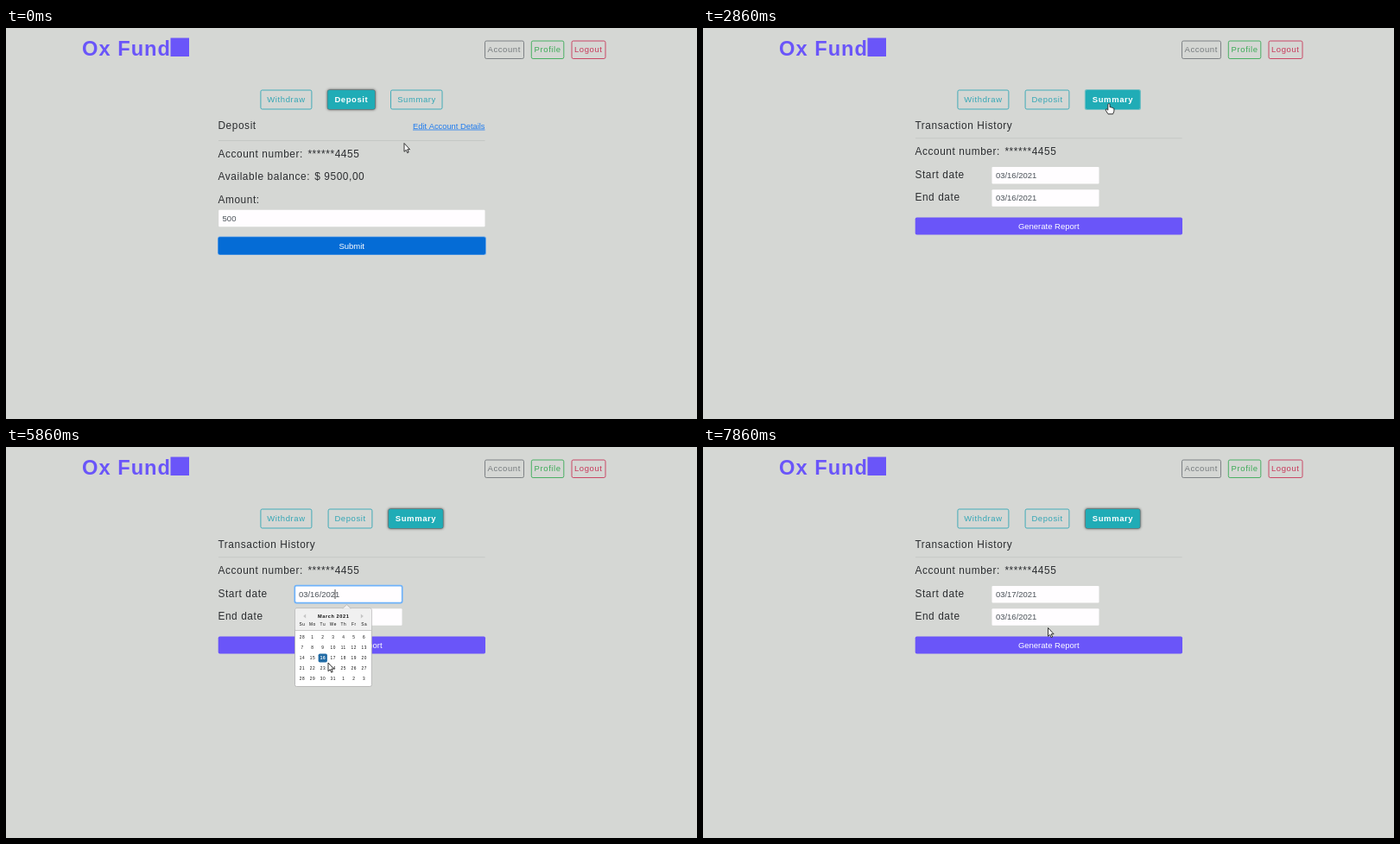
Recreate the animation shown at these times as an HTML page with a canvas. Size 800x453 px, loop 8 s.

```html
<!DOCTYPE html>
<html lang="en">
<head>
<meta charset="utf-8">
<title>Account</title>
<style>
html, body { margin: 0; width: 100%; height: 100%; overflow: hidden; background: #d5d7d4; }
canvas { display: block; }
</style>
</head>
<body>
<canvas id="stage" width="800" height="453"></canvas>
<script>
const ctx = document.getElementById('stage').getContext('2d');
const LOOP = 8000, STEPS = 56;
const INK = '#2b2d30', FIELD = '#495057', TEAL = '#20acb6', PURPLE = '#6a55f9', BLUE = '#056cd6';
const SMALL = 9.49, LARGE = 11.86, SPACING = 0.593;

// [step, x, y, pointer]; positions between entries are interpolated
const PATH = [
  [0, 461, 133.5, 'arrow'], [1, 462, 130, 'arrow'], [3, 467, 104, 'arrow'],
  [4, 468.5, 94, 'hand'], [7, 470, 87.5, 'hand'], [25, 470, 87.5, 'hand'],
  [27, 467.5, 90.5, 'hand'], [28, 454, 108, 'arrow'], [30, 408, 153, 'arrow'],
  [31, 390, 166, 'beam'], [33, 381, 171, 'beam'], [35, 381, 172, 'beam'],
  [36, 380, 184, 'arrow'], [39, 375, 238, 'arrow'], [41, 373, 250, 'arrow'],
  [43, 375, 246, 'hand'], [49, 376, 244.5, 'hand'], [52, 375.5, 244.5, 'arrow'],
  [53, 375.5, 244.5, 'arrow'], [54, 386, 228, 'hand'], [55, 399.5, 209.5, 'arrow']
];

function text(str, x, y, { size = SMALL, color = INK, spacing = 0, bold = false, align = 'left' } = {}) {
  ctx.font = `${bold ? 'bold ' : ''}${size}px "Liberation Sans", Arial, sans-serif`;
  ctx.letterSpacing = spacing + 'px';
  ctx.textAlign = align;
  ctx.fillStyle = color;
  ctx.fillText(str, x, y);
}

const label = (str, x, y) => text(str, x, y, { size: LARGE, spacing: SPACING });

function box(x, y, w, h, fill, stroke, radius = 1.8, width = 0.9) {
  ctx.beginPath();
  ctx.roundRect(x, y, w, h, radius);
  if (fill) { ctx.fillStyle = fill; ctx.fill(); }
  if (stroke) { ctx.strokeStyle = stroke; ctx.lineWidth = width; ctx.stroke(); }
}

function outlineButton(str, x, y, w, h, textX, color) {
  box(x, y, w, h, null, color);
  text(str, textX, y + h / 2 + 3.1, { color, spacing: SPACING });
}

function filledTab(str, x, w, textX, ring, bold = true) {
  if (ring === 'shadow') {
    ctx.save();
    ctx.shadowColor = 'rgba(40,40,40,.9)';
    ctx.shadowBlur = 3;
    box(x, 71.5, w, 23, '#4f7376', null, 2.5);
    ctx.restore();
  } else if (ring === 'glow') {
    box(x - 0.7, 71.1, w + 1.4, 23.8, 'rgba(32,172,182,.55)', null, 2.5);
  }
  box(x + 0.5, 72, w - 1, 22, TEAL);
  text(str, textX, 86.2, { color: '#fff', spacing: SPACING, bold });
}

function rule(y) {
  ctx.fillStyle = '#c1c3c1';
  ctx.fillRect(246, y, 308.5, 0.8);
}

function input(str, x, y, w, ring = 0) {
  box(x, y, w, 19.5, '#fffdff', null, 1);
  if (ring) box(x - 0.2, y - 0.2, w + 0.4, 19.9, null, `rgba(110,178,250,${ring})`, 2, 1.7);
  text(str, x + 4.4, y + 12.7, { color: FIELD });
}

function wideButton(str, y, fill, ring) {
  if (ring) box(245, y - 0.7, 311, 21.6, 'rgba(90,160,235,.85)', null, 2.5);
  box(245.7, y, 309.3, 20.2, fill);
  text(str, 400.2, y + 13.4, { color: '#fff', align: 'center' });
}

function header() {
  text('Ox Fund', 88, 32.4, { size: 23.7, color: PURPLE, spacing: 1, bold: true });
  ctx.fillStyle = PURPLE;
  ctx.fillRect(190.5, 11.5, 21.5, 21.5);
  outlineButton('Account', 554.5, 15, 45, 20.5, 557.5, '#74797c');
  outlineButton('Profile', 608.3, 15, 37.5, 20.5, 611.6, '#3cab57');
  outlineButton('Logout', 655, 15, 39, 20.5, 658, '#c8385a');
  outlineButton('Withdraw', 294.9, 72, 59, 22, 302.3, '#32a6b5');
}

function depositPage(step) {
  filledTab('Deposit', 372, 55.5, 380.4, 'shadow');
  if (step < 4) outlineButton('Summary', 445.5, 72, 59.5, 22, 453.2, '#32a6b5');
  else filledTab('Summary', 445, 60.5, 453.2, step >= 18 && 'glow', false);

  label('Deposit', 245.4, 116.8);
  text('Edit Account Details', 471, 116.7, { size: 9.33, color: '#1f7bee' });
  ctx.fillStyle = '#1f7bee';
  ctx.fillRect(471, 117.6, 83.5, 0.8);
  rule(130);
  label('Account number:', 245.4, 149.8);
  label('******4455', 349.4, 149.8);
  label('Available balance:', 245.4, 176.3);
  label('$ 9500,00', 357.2, 176.3);
  label('Amount:', 245.4, 202.8);
  input('500', 246.2, 210.8, 308.3);
  wideButton('Submit', 242.2, step < 18 ? BLUE : step === 18 ? '#4a5cee' : PURPLE, step < 18);
}

function summaryPage(step) {
  const open = step >= 33 && step < 51;
  outlineButton('Deposit', 373.1, 72, 50.8, 22, 380.4, '#32a6b5');
  filledTab('Summary', 442.5, 63.8, 450.8, step < 33 ? 'glow' : 'shadow');

  label('Transaction History', 245.4, 116.8);
  rule(127.4);
  label('Account number:', 245.4, 146.8);
  label('******4455', 349.4, 146.8);
  label('Start date', 245.4, 173.6);
  label('End date', 245.4, 200.2);
  input(step < 51 ? '03/16/2021' : '03/17/2021', 334.5, 160.9, 124, open ? 1 : step === 51 ? 0.4 : 0);
  input('03/16/2021', 334.5, 187.3, 124);
  wideButton('Generate Report', 219.4, PURPLE);

  if (open) {
    if ((step - 33) * LOOP / STEPS % 1060 < 530) {
      ctx.fillStyle = '#222';
      ctx.fillRect(380.6, 165, 0.8, 11);
    }
    calendar(step);
  }
}

function triangle(points, fill) {
  ctx.beginPath();
  points.forEach(([x, y]) => ctx.lineTo(x, y));
  ctx.closePath();
  ctx.fillStyle = fill;
  ctx.fill();
}

function calendar(step) {
  box(334.5, 186.9, 88.8, 90.6, '#fff', '#aeaeae', 2, 0.8);
  box(334.9, 187.2, 88, 25, '#f0f0f0', null, 1.5);
  ctx.fillStyle = '#b4b4b4';
  ctx.fillRect(334.9, 212, 88, 0.7);
  triangle([[389.3, 187.3], [394.5, 182], [399.7, 187.3]], '#b8b8b8');
  triangle([[389.9, 187.6], [394.5, 182.9], [399.1, 187.6]], '#f0f0f0');
  triangle([[344.2, 196], [347.2, 193.4], [347.2, 198.6]], '#c4c4c4');
  triangle([[413.8, 196], [410.8, 193.4], [410.8, 198.6]], '#c4c4c4');
  text('March 2021', 379.2, 197.7, { size: 5.6, color: '#111', spacing: SPACING, bold: true, align: 'center' });

  const columnX = i => 343 + i * 11.95;
  const day = { size: 4.75, color: '#111', spacing: SPACING, align: 'center' };
  ['Su', 'Mo', 'Tu', 'We', 'Th', 'Fr', 'Sa'].forEach((name, i) => text(name, columnX(i), 207.4, day));
  for (let i = 0; i < 35; i++) {
    const x = columnX(i % 7), y = 220.6 + Math.floor(i / 7) * 11.95;
    const date = i === 0 ? 28 : (i - 1) % 31 + 1;
    const selected = i === 16;
    if (selected) box(x - 5.3, y - 5, 10.3, 10, '#216ba5');
    else if (i === 17 && step >= 43) box(x - 5.3, y - 5, 10.3, 10, '#f0f0f0');
    text(date, x, y + 1.8, selected ? { ...day, color: '#fff', bold: true } : day);
  }
}

const SHAPES = {
  arrow: new Path2D('M0 0V9.8L2.2 7.8L3.7 11.2L5.2 10.5L3.7 7.2H6.6Z'),
  hand: new Path2D('M-1.2 .8Q0-.7 1.1 .8V4.3Q2.3 3.6 2.9 4.7Q4.2 4.2 4.5 5.3Q5.9 5 5.9 6.4V8.8L4.6 12.2H-1L-3.9 7.6Q-3.9 6-2.3 6.6L-1.2 7.7Z'),
  beam: new Path2D('M-2-5.5Q0-5.5 0-4.5Q0-5.5 2-5.5M0-4.5V4.5M-2 5.5Q0 5.5 0 4.5Q0 5.5 2 5.5')
};

function pointer(step) {
  let i = PATH.length - 1;
  while (PATH[i][0] > step) i--;
  const [start, x, y, kind] = PATH[i];
  const [end, nextX, nextY] = PATH[i + 1] || [start + 1, x, y];
  const mix = (step - start) / (end - start);
  ctx.save();
  ctx.translate(x + (nextX - x) * mix, y + (nextY - y) * mix);
  ctx.lineWidth = 0.9;
  ctx.lineJoin = 'round';
  ctx.strokeStyle = '#222';
  if (kind !== 'beam') { ctx.fillStyle = '#fff'; ctx.fill(SHAPES[kind]); }
  ctx.stroke(SHAPES[kind]);
  ctx.restore();
}

function draw(now) {
  const step = Math.floor((now % LOOP) / LOOP * STEPS + 0.05) % STEPS;
  ctx.fillStyle = '#d5d7d4';
  ctx.fillRect(0, 0, 800, 453);
  header();
  (step < 20 ? depositPage : summaryPage)(step);
  pointer(step);
}

const begin = performance.now();
function tick() {
  draw(performance.now() - begin);
  requestAnimationFrame(tick);
}
tick();
</script>
</body>
</html>
```
